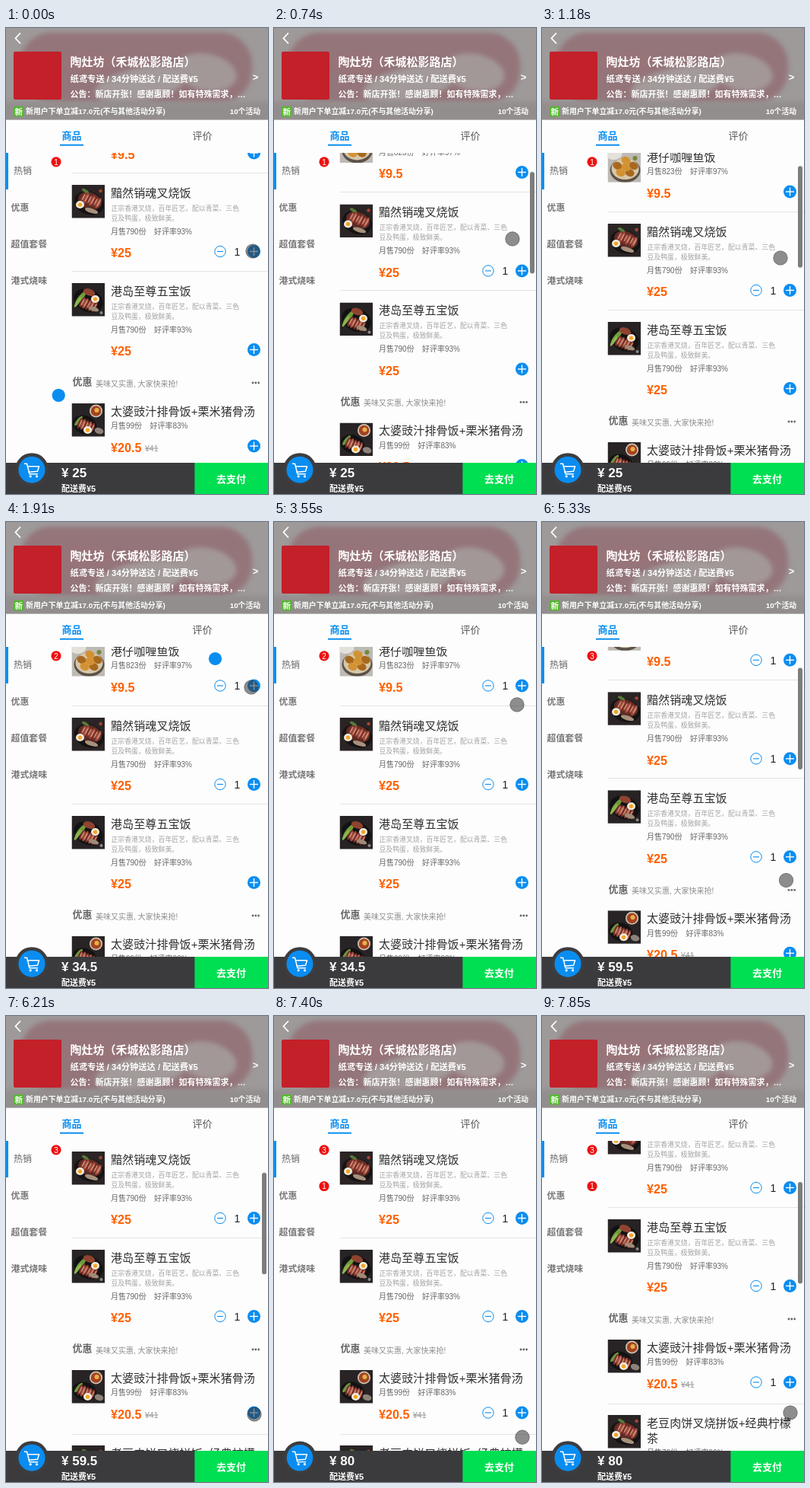
These frames come from a looping animation (345 by 612 pixels, 8 s). An HTML page with a canvas:

```html
<!DOCTYPE html>
<html lang="zh-CN">
<head>
<meta charset="utf-8">
<style>
html, body { margin: 0; width: 100%; height: 100%; overflow: hidden; background: #fdfdfd; }
canvas { display: block; width: 345px; height: 612px; }
</style>
</head>
<body>
<canvas id="stage"></canvas>
<script>
const W = 345, H = 612, LOOP = 8000, STEP = 147.9;
const HEAD_H = 120.5, FOOT_Y = 571;
const FONT = '"Liberation Sans", "Noto Sans CJK SC", "Noto Sans CJK", sans-serif';
const BLUE = '#0a8df0', ORANGE = '#ff6000', RED = '#ee1111';
const canvas = document.getElementById('stage');
const ctx = canvas.getContext('2d');
const dpr = window.devicePixelRatio || 1;
canvas.width = W * dpr;
canvas.height = H * dpr;

// Scroll offset, cursor and scrollbar opacity over time
const SCROLL = [[440, 0], [1040, 51], [5000, 51], [5720, -28], [7480, -28], [7830, -68]];
const CURSOR = [
  [150, 325, 293], [420, 314, 252], [740, 314, 277], [1040, 314, 302], [1200, 314, 302],
  [1700, 323, 217], [3410, 323, 217], [3550, 320, 240], [3950, 326, 472], [4500, 326, 472],
  [4900, 321.5, 503], [5000, 321.5, 503], [5330, 321.5, 470], [5740, 321.5, 424], [5850, 321.5, 424],
  [6150, 327, 523], [7150, 327, 523], [7450, 327, 560], [7830, 327, 521]
];
const BAR = [[430, 0], [450, 1], [1560, 1], [1760, 0], [4990, 0], [5010, 1],
  [6250, 1], [6450, 0], [7470, 0], [7490, 1]];
const BOUNCE = [[0, 1], [75, 1.22], [120, 0.9], [300, 0.95], [420, 1]];

const FLIGHT = 607, CART = { x: 34, y: 580.2 };
const CLICKS = [
  { t: -534, y: 293, add: 25 },
  { t: 1816, y: 215, add: 9.5 },
  { t: 4075, y: 473, add: 25 },
  { t: 6400, y: 522, add: 20.5 }
];

const DESC = ['正宗香港叉烧，百年匠艺，配以青菜、三色', '豆及鸭蛋，极致鲜美。'];
const ITEMS = [
  { y: 118, title: ['港仔咖喱鱼饭'], sold: 823, rate: 97, price: '9.5', click: 1, food: 'curry' },
  { y: 216, title: ['黯然销魂叉烧饭'], desc: DESC, sold: 790, rate: 93, price: '25', click: 0, food: 'pork' },
  { y: 345, title: ['港岛至尊五宝饭'], desc: DESC, sold: 790, rate: 93, price: '25', click: 2, food: 'mixed' },
  { y: 503, title: ['太婆豉汁排骨饭+栗米猪骨汤'], sold: 99, rate: 83, price: '20.5', old: '41', click: 3, food: 'soup' },
  { y: 602, title: ['老豆肉饼叉烧拼饭+经典柠檬', '茶'], sold: 76, rate: 90, price: '25', click: 9, food: 'pork' }
];

const smooth = k => k * k * (3 - 2 * k);
const linear = k => k;

function track(keys, t, ease = linear, col = 1) {
  if (t <= keys[0][0]) return keys[0][col];
  for (let i = 1; i < keys.length; i++) {
    const a = keys[i - 1], b = keys[i];
    if (t < b[0]) return a[col] + (b[col] - a[col]) * ease((t - a[0]) / (b[0] - a[0]));
  }
  return keys[keys.length - 1][col];
}

// Text placed by its vertical centre
function text(str, x, cy, size, color, weight = 400, align = 'left') {
  ctx.font = `${weight} ${size}px ${FONT}`;
  ctx.textAlign = align;
  ctx.fillStyle = color;
  ctx.fillText(str, x, cy + size * 0.37);
}

function rect(x, y, w, h, color, r = 0) {
  ctx.fillStyle = color;
  ctx.beginPath();
  ctx.roundRect(x, y, w, h, r);
  ctx.fill();
}

function oval(x, y, rx, ry, color, turn = 0) {
  ctx.fillStyle = color;
  ctx.beginPath();
  ctx.ellipse(x, y, rx, ry, turn, 0, Math.PI * 2);
  ctx.fill();
}

const dot = (x, y, r, color) => oval(x, y, r, r, color);

function line(points, color, width) {
  ctx.strokeStyle = color;
  ctx.lineWidth = width;
  ctx.beginPath();
  points.forEach(([x, y]) => ctx.lineTo(x, y));
  ctx.stroke();
}

function egg(x, y) {
  oval(x, y, 5.5, 5, '#f1e9dc');
  dot(x, y, 2.6, '#f0a422');
}

function meat(x, y, n, turn) {
  for (let i = 0; i < n; i++) {
    oval(x + i * 4, y + i * 1.6, 2.6, 7.5, i % 2 ? '#a34a3a' : '#7b2f27', turn);
    oval(x + i * 4 + 0.6, y + i * 1.6, 0.8, 5, '#cf9680', turn);
  }
}

const FOODS = {
  curry() {
    rect(0, 0, 44, 44, '#bdb9b4');
    oval(8, 6, 11, 8, '#e4e1db');
    oval(23, 28, 20, 16, '#5d5247');
    oval(23, 26, 18, 14, '#d6c7aa');
    [[13, 22], [24, 15], [34, 22], [17, 31], [29, 31], [24, 24]].forEach(([x, y], i) =>
      oval(x, y, 6.2, 5, i % 2 ? '#d39232' : '#a8691f', 0.4));
    dot(36, 12, 3, '#75883a');
  },
  pork() {
    rect(0, 0, 44, 44, '#2a2425');
    oval(23, 24, 20, 15, '#151314', 0.35);
    oval(24, 21, 16, 11, '#5a2b25', 0.35);
    meat(15, 16, 6, 0.5);
    egg(11, 26);
    oval(26, 34, 9, 3, '#a8917c', 0.3);
    oval(18, 8, 5, 2, '#56793a', 0.5);
    dot(38, 8, 2.2, '#a9442f');
  },
  mixed() {
    rect(0, 0, 44, 44, '#272324');
    oval(22, 23, 20, 15, '#131213', 0.4);
    oval(12, 19, 3, 11, '#6f9c3a', 0.7);
    oval(8, 25, 2, 8, '#8cb64e', 0.6);
    oval(23, 12, 8, 4.5, '#8f4330', 0.3);
    meat(14, 25, 5, 0.5);
    egg(31, 21);
    oval(29, 34, 7, 3, '#a08a76', 0.3);
    dot(39, 39, 2, '#8e8a83');
  },
  soup() {
    rect(0, 0, 44, 44, '#282425');
    dot(32, 10, 8.5, '#cfc4b4');
    dot(32, 10, 6.8, '#a5431f');
    dot(33, 9, 3, '#e5b14c');
    oval(17, 28, 16, 12, '#131213', 0.3);
    oval(9, 23, 2.5, 8, '#6f9440', 0.7);
    meat(11, 26, 5, 0.4);
    egg(21, 35);
    oval(36, 36, 6, 4, '#8d8279', 0.3);
  }
};

function photo(kind, x, y) {
  ctx.save();
  ctx.translate(x, y);
  ctx.beginPath();
  ctx.rect(0, 0, 43.5, 43.5);
  ctx.clip();
  FOODS[kind]();
  ctx.restore();
}

function stepper(y, count) {
  if (count) {
    ctx.strokeStyle = BLUE;
    ctx.lineWidth = 1;
    ctx.beginPath();
    ctx.arc(282, y, 7.2, 0, Math.PI * 2);
    ctx.stroke();
    line([[278, y], [286, y]], BLUE, 1.1);
    text(count, 304.5, y, 14, '#222', 400, 'center');
  }
  dot(326.5, y, 8.5, BLUE);
  line([[321, y], [332, y]], '#fff', 1.4);
  line([[326.5, y - 5.5], [326.5, y + 5.5]], '#fff', 1.4);
}

function drawItem(item, shift, t) {
  let y = item.y + shift;
  photo(item.food, 86.5, y - 10);
  item.title.forEach((s, i) => text(s, 138, y + i * 20, 15.1, '#2f2f2f'));
  y += (item.title.length - 1) * 20;
  if (item.desc) {
    item.desc.forEach((s, i) => text(s, 138.5, y + 20.5 + i * 13, 8.9, '#a2a2a2'));
    y += 31.5;
  }
  text(`月售${item.sold}份`, 138, y + 19.5, 10, '#666');
  text(`好评率${item.rate}%`, item.sold < 100 ? 189.5 : 195, y + 19.5, 10, '#666');
  text('¥' + item.price, 138, y + 47.7, 16.2, ORANGE, 700);
  if (item.old) {
    text('¥' + item.old, 183, y + 49, 10.5, '#999');
    line([[183, y + 49], [200.5, y + 49]], '#999', 1);
  }
  const click = CLICKS[item.click];
  stepper(y + 46, click && t >= click.t ? 1 : 0);
}

function drawList(t) {
  const shift = track(SCROLL, t, smooth);
  ctx.save();
  ctx.beginPath();
  ctx.rect(76, 164, W - 76, FOOT_Y - 164);
  ctx.clip();
  [190, 319, 577].forEach(y => rect(87, Math.round(y + shift), W - 87, 1, '#e4e4e4'));
  ITEMS.forEach(item => drawItem(item, shift, t));

  const y = 464.5 + shift;
  text('优惠', 87.5, y, 13, '#666', 700);
  text('美味又实惠, 大家快来抢!', 118, y + 2.5, 10, '#8c8c8c');
  [325, 328.8, 332.6].forEach(x => dot(x, y + 1.5, 1.4, '#666'));

  ctx.globalAlpha = track(BAR, t);
  rect(337, 197 - 0.31 * shift, 6, 133.5, '#7d7d7d', 3);
  ctx.restore();
}

function drawHeader() {
  ctx.save();
  ctx.beginPath();
  ctx.rect(0, 0, W, HEAD_H);
  ctx.clip();
  rect(0, 0, W, HEAD_H, '#9e9a9a');
  ctx.filter = `blur(${3 * dpr}px)`;
  rect(18, 6, 306, 92, '#94757a', 42);
  oval(178, 74, 62, 22, '#a39a9a', -0.2);
  oval(264, 58, 40, 24, '#a39898', 0.2);
  oval(110, 46, 40, 14, '#987479');
  rect(-10, 97, W + 20, 34, '#938e8e');
  ctx.restore();

  line([[19, 6.5], [12.5, 13.5], [19, 20.5]], '#fff', 1.8);
  rect(10, 31, 63, 63, '#c3202a', 2);
  text('陶灶坊（禾城松影路店）', 84.5, 44, 15, '#fff', 700);
  text('纸鸢专送 / 34分钟送达 / 配送费¥5', 84.5, 67, 11.3, '#fff', 700);
  text('公告：新店开张！感谢惠顾！如有特殊需求，…', 84.5, 86.5, 11, '#fff', 700);
  text('>', 328.5, 64.5, 13, '#fff', 700, 'center');
  rect(10, 103, 13.5, 13.5, '#56b830', 2);
  text('新', 16.8, 109.7, 10.5, '#fff', 700, 'center');
  text('新用户下单立减17.0元(不与其他活动分享)', 26, 109.5, 9.9, '#fff', 700);
  text('10个活动', 335, 109.5, 9.8, '#fff', 700, 'right');

  text('商品', 86.5, 141.5, 13, BLUE, 700, 'center');
  text('评价', 258.5, 141.5, 13, '#555', 400, 'center');
  rect(71, 152.7, 31, 2, BLUE);
}

function badge(y, n) {
  dot(66, y, 6.6, RED);
  text(n, 66, y, 10, '#fff', 400, 'center');
}

function drawMenu(clicked) {
  rect(0, 164, 3, 48, BLUE);
  text('热销', 10, 188, 12, '#666');
  ['优惠', '超值套餐', '港式烧味'].forEach((s, i) => text(s, 6.5, 236 + i * 47.6, 11.9, '#777', 700));
  badge(175.8, Math.min(clicked, 3));
  if (clicked > 3) badge(223.5, 1);
}

function drawCart(scale) {
  ctx.save();
  ctx.translate(CART.x, CART.y);
  ctx.scale(scale, scale);
  dot(0, 0, 22, '#3d3d3f');
  dot(0, 0, 17.5, BLUE);
  ctx.lineJoin = ctx.lineCap = 'round';
  line([[-9.5, -8], [-6.5, -8], [-3, 5.5], [7.5, 5.5]], '#fff', 1.5);
  line([[-5.5, -4.5], [9.5, -4.5], [7.5, 2], [-4, 3]], '#fff', 1.5);
  dot(-1.8, 8.6, 1.6, '#fff');
  dot(6.5, 8.6, 1.6, '#fff');
  ctx.restore();
}

function drawFooter(t, done) {
  rect(0, FOOT_Y, W, H - FOOT_Y, '#3b3b3d');
  rect(248.4, FOOT_Y, W - 248.4, H - FOOT_Y, '#00de52');
  const total = done.reduce((sum, c) => sum + c.add, 0);
  text('¥ ' + total, 73, 584, 17, '#fff', 700);
  text('配送费¥5', 73, 604.7, 11, '#fff', 700);
  text('去支付', 296.5, 592, 13, '#fff', 700, 'center');
  drawCart(track(BOUNCE, t - done[done.length - 1].t - FLIGHT));
}

function drawBall(t, click) {
  const k = (t - click.t) / FLIGHT;
  if (k >= 1) return;
  const drop = 1.9 * k * k - 0.9 * k;
  dot(327 + (CART.x - 327) * k, click.y + (572 - click.y) * drop, 8.6, BLUE);
}

function draw(t) {
  ctx.setTransform(dpr, 0, 0, dpr, 0, 0);
  rect(0, 0, W, H, '#fdfdfd');
  const done = CLICKS.filter(c => t >= c.t);
  drawList(t);
  drawHeader();
  drawMenu(done.length);
  drawFooter(t, done);
  drawBall(t, done[done.length - 1]);

  const x = track(CURSOR, t, linear, 1), y = track(CURSOR, t, linear, 2);
  dot(x, y, 9.6, 'rgba(50, 50, 50, 0.55)');
  ctx.strokeStyle = 'rgba(60, 60, 60, 0.3)';
  ctx.lineWidth = 1;
  ctx.beginPath();
  ctx.arc(x, y, 9.1, 0, Math.PI * 2);
  ctx.stroke();
}

const start = performance.now();
function tick() {
  const t = (performance.now() - start) % LOOP;
  draw(Math.min(53, Math.floor((t + 15) / 148)) * STEP);
  requestAnimationFrame(tick);
}
tick();
</script>
</body>
</html>
```
